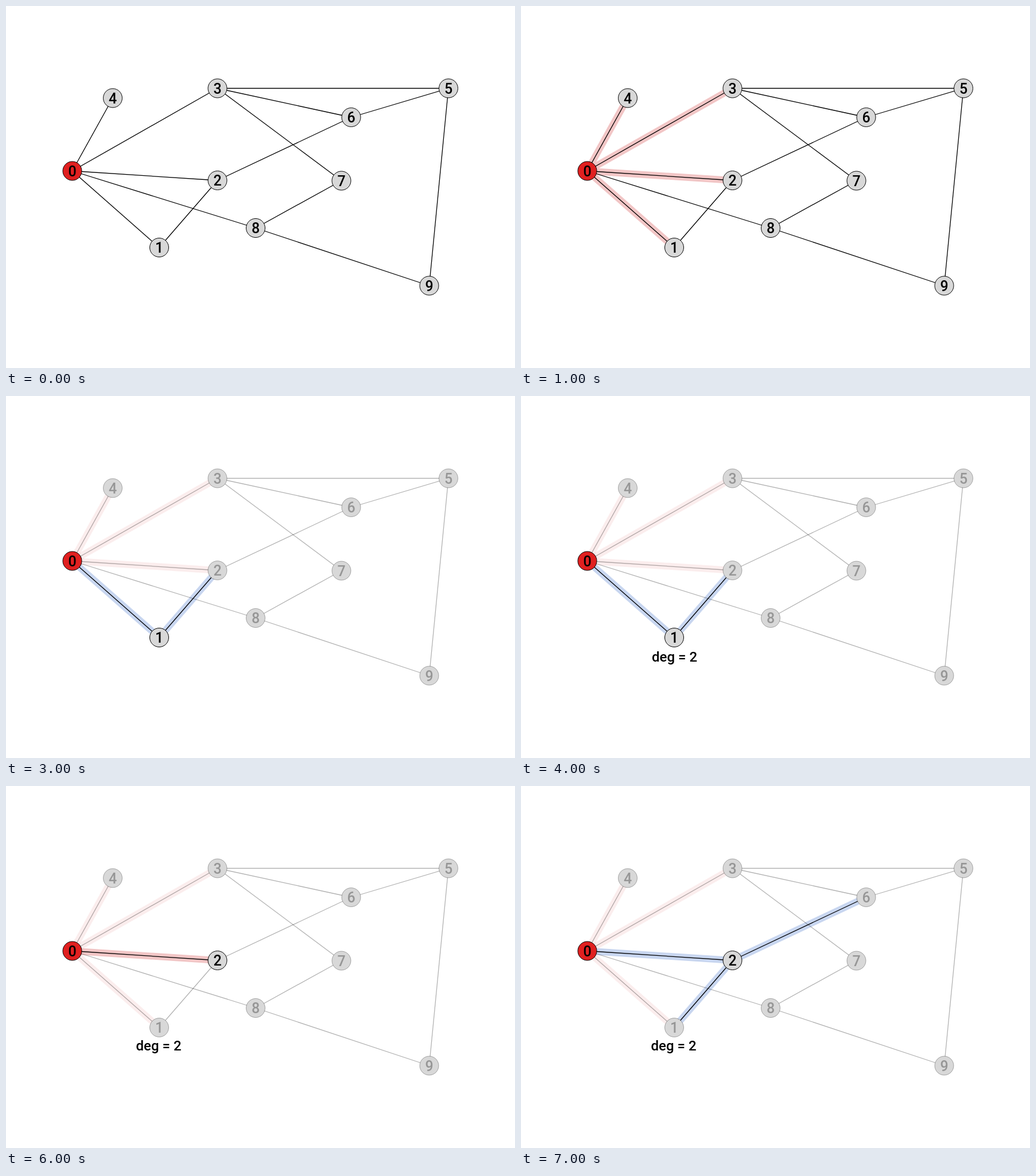
An HTML page for the animation above (8 s loop, 887x631 px).

```html
<!DOCTYPE html>
<html lang="en">
<head>
<meta charset="utf-8">
<title>Graph degrees</title>
<style>
  html, body { margin: 0; width: 100%; height: 100%; overflow: hidden; background: #fff; }
  svg { display: block; width: 100%; height: 100%; }
  text { font-family: Roboto, "Open Sans", sans-serif; font-weight: 500; text-anchor: middle; }
</style>
</head>
<body>
<svg id="stage" viewBox="0 0 887 631">
  <g id="bands"></g>
  <g id="lines"></g>
  <g id="dots"></g>
  <text id="label" font-size="24">deg = 2</text>
</svg>
<script>
const STEP = 1000, LOOP = 8000, DIM = 0.3, RADIUS = 16.5;
const PINK = '#f2c6c6', BLUE = '#c8d6f0';
const points = [
  [115.5, 287.5], [267, 421], [368.5, 304], [368.5, 143.5], [186, 160.5],
  [771, 143.5], [601.5, 194], [584.5, 304.5], [435, 387], [737.5, 487.5]
];
const links = '01 02 03 04 08 12 26 35 36 37 56 59 78 89'.split(' ');
const fan = ['01', '02', '03', '04'];

// focus: lit node, blue: counted edges, label: centre x and baseline
const states = [
  {},
  { pink: true },
  { pink: true, dim: true, focus: 1 },
  { pink: true, dim: true, focus: 1, blue: ['01', '12'] },
  { pink: true, dim: true, focus: 1, blue: ['01', '12'], label: [267.5, 463] },
  { pink: true, dim: true, label: [267, 467] },
  { pink: true, dim: true, focus: 2, label: [266, 461] },
  { pink: true, dim: true, focus: 2, blue: ['02', '12', '26'], label: [266, 461] }
];

const byId = id => document.getElementById(id);
function add(parent, tag, attrs) {
  const el = document.createElementNS('http://www.w3.org/2000/svg', tag);
  set(el, attrs);
  return parent.appendChild(el);
}
function set(el, attrs) {
  for (const k in attrs) el.setAttribute(k, attrs[k]);
}

const edges = links.map(id => {
  const [[x1, y1], [x2, y2]] = [...id].map(n => points[n]);
  const ends = { x1, y1, x2, y2 };
  return {
    id,
    band: add(byId('bands'), 'line', { ...ends, 'stroke-width': 12 }),
    line: add(byId('lines'), 'line', { ...ends, stroke: '#000', 'stroke-width': 1.3 })
  };
});

const nodes = points.map(([cx, cy], i) => {
  const g = add(byId('dots'), 'g', {});
  const ring = add(g, 'circle', {
    cx, cy, r: RADIUS, fill: i ? '#d8d8d8' : '#e02020', stroke: '#000', 'stroke-width': 1
  });
  const text = add(g, 'text', { x: cx, y: cy + 9.2, 'font-size': 25 });
  text.textContent = i;
  return { ring, text };
});

function draw(time) {
  const { pink, dim, focus, blue = [], label } = states[Math.floor(time / STEP)];

  for (const { id, band, line } of edges) {
    const counted = blue.includes(id);
    const lit = !dim || counted || id === '0' + focus;
    const alpha = lit ? 1 : DIM;
    const shown = counted || (pink && fan.includes(id));
    set(band, { stroke: counted ? BLUE : PINK, opacity: shown ? alpha : 0 });
    set(line, { opacity: alpha });
  }
  nodes.forEach(({ ring, text }, i) => {
    const alpha = !dim || i === 0 || i === focus ? 1 : DIM;
    set(ring, { 'stroke-opacity': alpha });
    set(text, { opacity: alpha });
  });

  const [x, y] = label || [0, 0];
  set(byId('label'), { x, y, visibility: label ? 'visible' : 'hidden' });
}

const start = performance.now();
function tick() {
  draw((performance.now() - start) % LOOP);
  requestAnimationFrame(tick);
}
tick();
</script>
</body>
</html>
```
